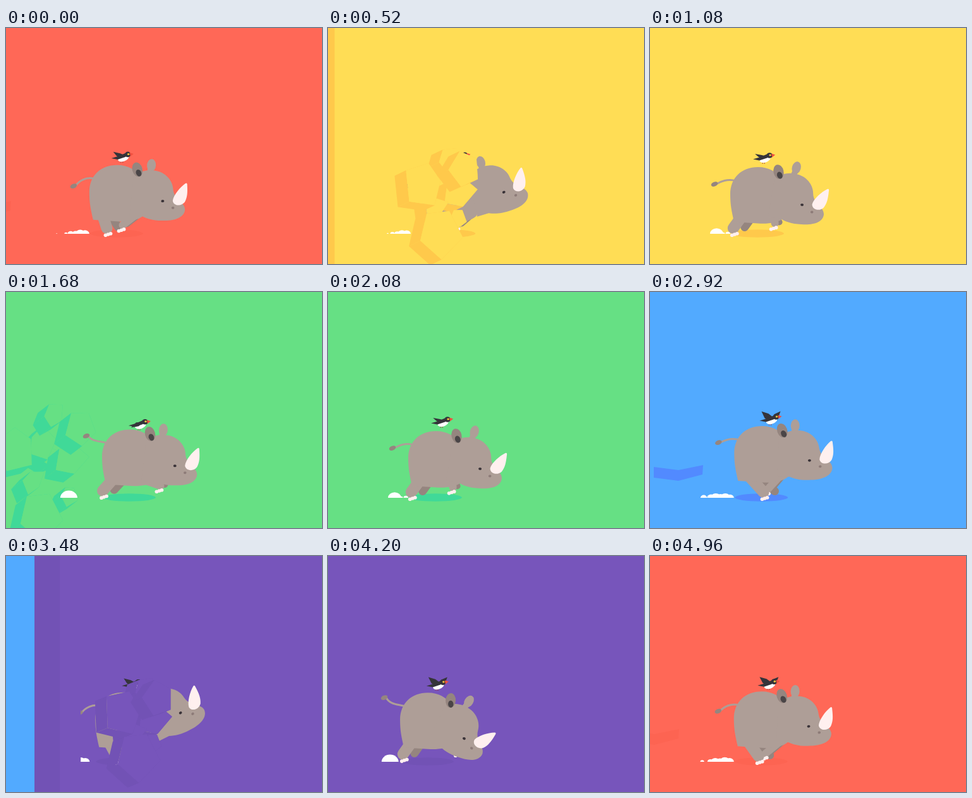
Recreate the animation shown at these times as an HTML page with a canvas. Size 500 by 375 pixels, loop 5 s.

```html
<!DOCTYPE html>
<html lang="en">
<head>
<meta charset="utf-8">
<title>Running rhino</title>
<style>
  html, body { margin: 0; width: 100%; height: 100%; overflow: hidden; background: #ff6857; }
  canvas { display: block; width: 100vw; height: 100vh; }
</style>
</head>
<body>
<canvas id="stage"></canvas>
<script>
const canvas = document.getElementById('stage');
const ctx = canvas.getContext('2d');
const W = 500, H = 375, TAU = Math.PI * 2;
const LOOP = 5000, BEAT = 1000, STRIDE = 500, TICK = 40;
const WALL_SPEED = 1.87, WALL_DEPTH = 40, HOLE = 73;
const SKIN = '#ae9e97', DARK_SKIN = '#95857f', INK = '#35343a', HORN = '#fff0ef';

// One room per beat: face colour and shade
const rooms = [
  ['#ff6857', '#fd6452'],
  ['#ffdd55', '#ffc94b'],
  ['#66e084', '#40d998'],
  ['#52aaff', '#528aff'],
  ['#7755bb', '#7252b5']
];

const torso = new Path2D('M0 43C0 17 18 0 44 0C62 0 72 8 80 16L94 60L86 80C72 92 50 90 36 89L6 87C2 70 0 60 0 43Z');
const skull = new Path2D('M203 234Q222 223 240 228C256 232 265 246 265 258C266 274 283 278 283 290C282 303 266 308 248 307C232 307 222 303 214 299L195 298Z');
const hornShape = new Path2D('M-10 1C-9 -8 1 -21 9 -27Q12 -29 12 -24C13 -12 13 -5 9 3C3 11 -9 9 -10 1Z');

const mod = (a, n) => ((a % n) + n) % n;
const lerp = (a, b, k) => a + (b - a) * k;

// Stride wave, peaking at the given moment
const wave = (g, peak) => Math.cos(TAU * (g - peak) / STRIDE);

// Soft pulse within the beat
function pulse(p, center, width) {
  const d = mod(p - center + BEAT / 2, BEAT) - BEAT / 2;
  return Math.exp(-((d / width) ** 2));
}

function seeded(seed) {
  return () => {
    seed = (seed * 16807) % 2147483647;
    return seed / 2147483647;
  };
}

function oval(x, y, rx, ry, color, tilt = 0, from = 0, to = TAU) {
  ctx.fillStyle = color;
  ctx.beginPath();
  ctx.ellipse(x, y, rx, ry, tilt, from, to);
  ctx.fill();
}

function poly(pts, color) {
  ctx.fillStyle = color;
  ctx.beginPath();
  for (let i = 0; i < pts.length; i += 2) ctx.lineTo(pts[i], pts[i + 1]);
  ctx.fill();
}

function stroke(path, color, width) {
  ctx.strokeStyle = color;
  ctx.lineWidth = width;
  ctx.lineCap = ctx.lineJoin = 'round';
  ctx.stroke(new Path2D(path));
}

function leg(hx, hy, fx, fy, width, color) {
  stroke(`M${hx} ${hy}L${fx} ${fy - width / 2}`, color, width);
}

function toes(x, y) {
  for (let i = -1; i < 2; i++) oval(x + i * 4, y - i * 1.3, 2.9, 2.8, HORN);
}

function dust(g) {
  const puff = (x, r) => oval(x, 327, r, r * .85, '#fff', 0, Math.PI, TAU);
  const age = mod(g - 80, STRIDE);
  puff(109 - .06 * age, 13.5 * Math.sin(Math.PI * (age / STRIDE) ** .6));
  for (let i = 0; i < 5; i++) {
    const a = mod(g - 270 - i * 25, STRIDE) / 330;
    if (a < 1) puff(101 + i * 7 - 7 * a, (7 + i % 2 * 1.5) * Math.sin(Math.PI * a));
  }
}

function bird(p, g, x, y) {
  const perch = pulse(p, 240, 90);
  ctx.save();
  ctx.translate(x + 60 - 8 * pulse(p, 590, 90), 204 + (y - 216) / 2 + 5 * perch);
  const lift = 8 + 4 * Math.cos(TAU * (g - 235) / 250);
  stroke('M-2 4L-3 9M1 4L0 9', '#a84240', 1);
  oval(1, 2, 9, 5, '#fff', -.35);
  poly([-18, 2, -8, -1, 4, -6, 9, -4, 4, 0, -8, 4], INK);
  if (perch > .4) {
    poly([-14, 5, -6, -3, 4, -3, -2, 3], INK);
  } else {
    poly([-4, 2, -10, -2, -15, -2 - lift * .9, -4, -1 - lift * .7, 5, -2], INK);
    if (lift > 9) poly([1, -2, 5, -lift * .7, 15, -1 - lift, 12, -4], INK);
  }
  oval(8, -4, 4.8, 4.3, INK);
  oval(9, -4.5, 1.7, 1.5, '#ffc83d');
  poly([11, -7, 17, -5, 12, -1], '#f0503f');
  ctx.restore();
}

// The head winds up, then tosses as the wall breaks
function head(p, x, y) {
  const windup = pulse(p, 790, 100), toss = pulse(p, 0, 110);
  const sway = 10 * pulse(p, 700, 100);
  ctx.save();
  ctx.translate(x + 77 + 4 * windup, y + 8 + 6 * windup);
  ctx.rotate((20 * windup - 34 * toss - 5 * pulse(p, 490, 60)) * Math.PI / 180);
  ctx.translate(-210, -226);
  oval(230 + sway, 219 - sway / 5, 7, 10, SKIN, .1 + sway / 50);
  stroke(`M${229 + sway} 222L${227 + sway / 2} 235`, SKIN, 9);
  ctx.fillStyle = SKIN;
  ctx.fill(skull);
  oval(209, 225, 8, 11.5, DARK_SKIN, -.25);
  oval(211, 230.5, 4.2, 5.6, '#4a4547', -.4);
  oval(248, 276, 2.5, 2, '#3a3338');
  oval(264, 287, 2.3, 2, '#8d7b78');
  ctx.translate(274, 275);
  ctx.rotate((2 + 16 * pulse(p, 750, 120) + 6 * toss) * Math.PI / 180);
  ctx.fillStyle = HORN;
  ctx.fill(hornShape);
  ctx.restore();
}

function rhino(p, shade) {
  const g = p % STRIDE, turn = TAU * p / BEAT;
  const x = 133 + 18 * Math.sin(turn) + 8 * Math.sin(2 * turn);
  const y = 216 + 5 * wave(g, 155);
  const backX = x + 23 + 25 * wave(g, 450);
  const backY = 329 - 5 * Math.max(0, wave(g, 330));
  const frontX = x + 70 - 22 * wave(g, 20);
  const frontY = 319 + 3 * wave(g, 0);

  oval(x + 43, 326.5, 42, 6.2, shade);
  dust(g);

  const tx = x - 25, ty = 235 + 17 * wave(g, 85), root = y + 22;
  stroke(`M${x + 9} ${root}C${x - 4} ${root - 4} ${x - 16} ${lerp(root, ty, .2)} ${tx + 3} ${ty}`, SKIN, 3);
  oval(tx, ty, 5.5, 3.5, DARK_SKIN, -.4);

  leg(x + 34, y + 80, backX + 18, backY - 6, 13, DARK_SKIN);
  leg(x + 74, y + 82, frontX + 9, frontY - 5, 10, DARK_SKIN);
  leg(x + 70, y + 82, frontX + 2, frontY - 2, 12, SKIN);
  toes(frontX, frontY);
  leg(x + 20, y + 76, backX, backY - 2, 18, SKIN);
  toes(backX + 2, backY - 1);

  ctx.save();
  ctx.translate(x, y);
  ctx.fillStyle = SKIN;
  ctx.fill(torso);
  ctx.restore();

  head(p, x, y);
  bird(p, g, x, y);
}

// A chunk of wall: face polygon with its thickness showing to the left
function chunk(pts, dx, dy, face, shade) {
  const n = pts.length;
  for (let i = 0; i < n; i++) {
    const [ax, ay] = pts[i], [bx, by] = pts[(i + 1) % n];
    poly([ax, ay, bx, by, bx + dx, by + dy, ax + dx, ay + dy], shade);
  }
  poly(pts.flat(), face);
}

function rubble(t, face, shade) {
  if (t < -60 || t > 460) return;
  const rnd = seeded(77), count = 9;
  const k = Math.max(0, t) / 240, grow = Math.min(1, (t + 60) / 60);
  for (let i = 0; i < count; i++) {
    const r = Math.sqrt(i / count), a = i * 2.4 + 1.5;
    const cx = lerp(290, lerp(245, 70, k) + lerp(28, 65, k) * r * Math.cos(a), grow);
    const cy = lerp(235, lerp(255, 262, k) + lerp(58, 100, k) * r * Math.sin(a), grow);
    const size = (15 + 15 * rnd()) * grow, spin = rnd() * TAU + k * (rnd() - .5);
    const pts = [];
    for (let j = 0; j < 5; j++) {
      const d = size * (.7 + .6 * rnd()), b = spin + j * TAU / 5;
      pts.push([cx + d * Math.cos(b), cy + d * 1.2 * Math.sin(b)]);
    }
    chunk(pts, -18 * grow, lerp(6, 14, k) * grow, face, shade);
  }
}

// The last slab lingers before sliding away
function slab(t, color) {
  if (t < 260 || t > 580) return;
  const k = (480 - t) / 240;
  const x = 6 + (k > 0 ? 62 : 228) * k;
  const y = 275 + 38 * Math.max(0, k);
  poly([x, y + 3, x + 39, y + 8, x + 78, y, x + 77, y + 15, x + 39, y + 25, x, y + 20], color);
}

function inside(x, w, draw) {
  if (w <= 0) return;
  ctx.save();
  ctx.beginPath();
  ctx.rect(x, 0, w, H);
  ctx.clip();
  draw();
  ctx.restore();
}

function render(time) {
  const u = time - 440;
  const n = Math.floor((u + 300) / BEAT);
  const t = u - n * BEAT;
  const p = mod(u, BEAT);
  const [oldFace, oldShade] = rooms[mod(n, 5)];
  const [face, shade] = rooms[mod(n + 1, 5)];
  const wall = 120 - WALL_SPEED * t;
  const edge = Math.max(0, wall + HOLE);
  const settled = t > 150;

  ctx.fillStyle = oldFace;
  ctx.fillRect(0, 0, W, H);
  inside(0, Math.min(W, wall), () => rhino(p, oldShade));

  ctx.fillStyle = face;
  ctx.fillRect(wall, 0, W - Math.min(wall, 0) + 10, H);
  ctx.fillStyle = shade;
  ctx.fillRect(wall, 0, WALL_DEPTH, H);

  if (settled) rubble(t, face, shade);
  slab(t, shade);
  inside(edge, W - edge, () => rhino(p, shade));
  if (!settled) rubble(t, face, shade);
}

function frame(now) {
  const ratio = window.devicePixelRatio || 1;
  const w = Math.round(innerWidth * ratio), h = Math.round(innerHeight * ratio);
  if (canvas.width !== w || canvas.height !== h) {
    canvas.width = w;
    canvas.height = h;
  }
  ctx.setTransform(w / W, 0, 0, h / H, 0, 0);
  render(Math.floor((now % LOOP) / TICK) * TICK);
  requestAnimationFrame(frame);
}
frame(performance.now());
</script>
</body>
</html>
```
